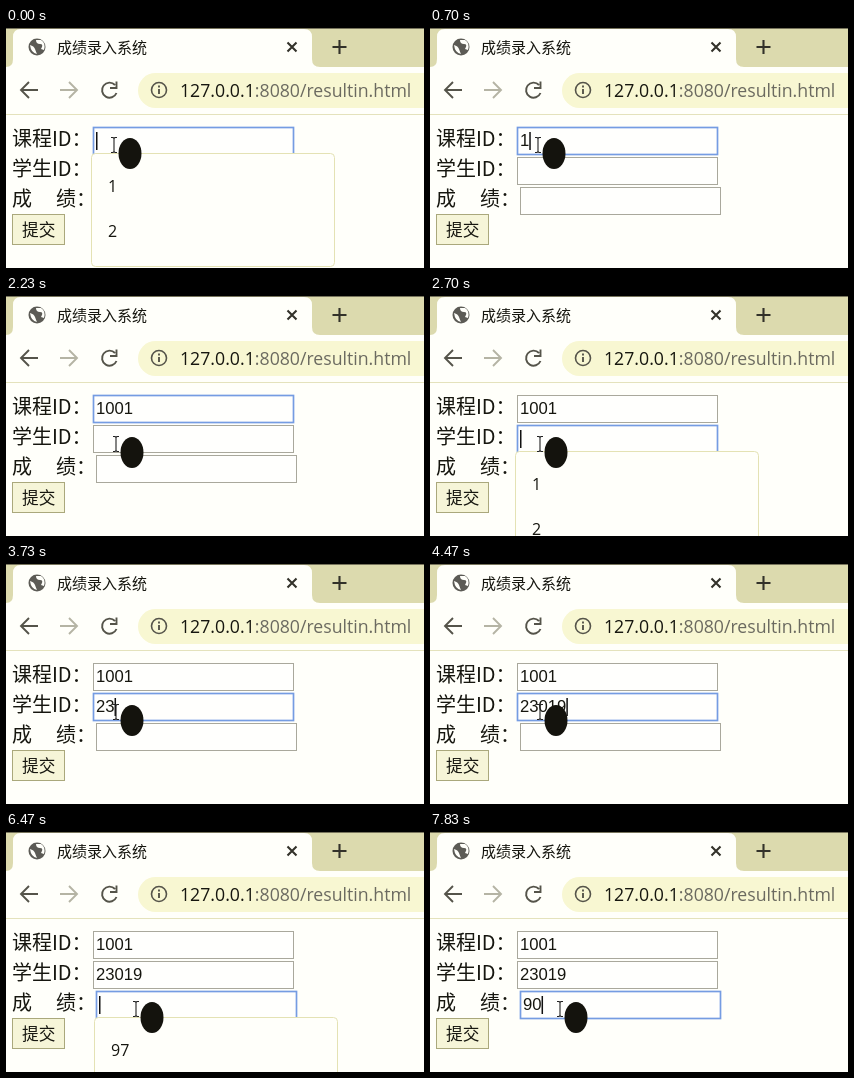
An HTML page for the animation above (8 s loop, 418 by 240 pixels).

```html
<!DOCTYPE html>
<html lang="zh-CN">
<head>
<meta charset="utf-8">
<title>成绩录入系统</title>
<style>
  html, body { margin: 0; width: 100%; height: 100%; overflow: hidden; background: #fffffa; }
  svg { display: block; }
  text { fill: #16160f; white-space: pre; }
  .cjk { font-family: "Noto Sans CJK SC", "Noto Sans CJK", sans-serif; }
  .label { font-size: 20px; }
  .url { font: 17.7px "Open Sans", "Noto Sans", sans-serif; }
  .value { font: 16.67px "Liberation Sans", Arial, sans-serif; }
  .item { font: 16px "Open Sans", "Noto Sans", sans-serif; }
  .icon { fill: none; stroke: #55544a; stroke-width: 1.9; }
  .dark { stroke: #33322a; stroke-width: 2.1; }
  .box { fill: #fffffd; stroke: #a9a89c; stroke-width: 1; }
  .box.focus { stroke: #759ce2; stroke-width: 1.7; }
</style>
</head>
<body>
<svg width="418" height="240" viewBox="0 0 418 240">
  <!-- tab strip -->
  <rect width="418" height="39" fill="#dcdaae"/>
  <path d="M0 39Q7 39 7 31V9Q7 1 15 1H298Q306 1 306 9V31Q306 39 314 39Z" fill="#fffffa"/>
  <rect width="418" height="1" fill="#77745c"/>
  <circle cx="31" cy="19" r="8.5" fill="#5c5b55"/>
  <path d="M24 17Q28 18 29 21T31 26Q25 25 24 17M30 12Q30 16 34 16T35 21L38 22Q40 15 35 12Z" fill="#fffffa"/>
  <text class="cjk" x="51" y="24.5" font-size="15">成绩录入系统</text>
  <path class="icon dark" d="M281.5 14.5l9 9m0-9l-9 9M326.500 19h14M333.500 12v14"/>

  <!-- toolbar -->
  <rect y="39" width="418" height="47" fill="#fffffa"/>
  <rect x="132" y="45" width="310" height="35" rx="17.500" fill="#f8f7d2"/>
  <path d="M0 86.500H418" stroke="#e4e2bc"/>
  <path class="icon" d="M32 62H15.500M23 54l-8 8 8 8"/>
  <path class="icon" d="M54 62H70.500M63 54l8 8-8 8" style="stroke:#b5b4a4"/>
  <path class="icon" d="M109 57A7.500 7.500 0 1 0 110.500 65M110.500 53.500V60H104"/>
  <circle class="icon" cx="153" cy="62" r="7.500" style="stroke-width:1.6"/>
  <path class="icon" d="M153 61v5M153 57.500v2"/>
  <text class="url" x="174" y="68.500">127.0.0.1<tspan fill="#6b6a60">:8080/resultin.html</tspan></text>

  <!-- form -->
  <text class="cjk label" x="6" y="118">课程ID：</text>
  <text class="cjk label" x="6" y="148">学生ID：</text>
  <text class="cjk label" x="6" y="178">成</text>
  <text class="cjk label" x="50" y="178">绩：</text>
  <g id="fields"></g>
  <rect x="6.500" y="186.500" width="52" height="30" fill="#f6f5d8" stroke="#aaa87c"/>
  <text class="cjk" x="16" y="208" font-size="16.67">提交</text>

  <rect id="caret" width="1.5" height="18" fill="#111"/>
  <g id="popup">
    <rect x=".5" y=".5" width="243" rx="4" fill="#fffffa" stroke="#e4e2b4"/>
    <text class="item" x="17" y="39"></text>
    <text class="item" x="17" y="84"></text>
  </g>
  <g id="pointer">
    <path d="M-3-7.500H-1L0-6.500 1-7.500H3M0-6.500V6.500M-3 7.500H-1L0 6.500 1 7.500H3" fill="none" stroke="#222" stroke-width="1.1"/>
    <ellipse cx="16" cy="8.500" rx="11.500" ry="15.500" fill="#14130d"/>
  </g>
</svg>
<script>
const LOOP = 8000, BLINK = 530, DIGIT = 9.27;
const $ = id => document.getElementById(id);
const lefts = [87.5, 87.5, 90.5];
const topOf = i => 99.5 + 30 * i;

$('fields').innerHTML = lefts.map((x, i) =>
  `<rect class="box" x="${x}" y="${topOf(i)}" width="200" height="27"/>
   <text class="value" x="${x + 2.5}" y="${topOf(i) + 18.5}"></text>`).join('');
const boxes = document.querySelectorAll('.box');
const values = document.querySelectorAll('.value');
const items = document.querySelectorAll('.item');

// time, field, value, suggestions
const inputs = [
  [-360, 0, '', ['1', '2']],
  [700, 0, '1'], [930, 0, '10'], [1230, 0, '100'], [1470, 0, '1001'],
  [2370, 1, '', ['1', '2']],
  [3530, 1, '2'], [3700, 1, '23'], [3900, 1, '230'], [4230, 1, '2301'], [4440, 1, '23019'],
  [5405, 2, '', ['97']],
  [7230, 2, '9', ['97']], [7780, 2, '90']
];

// time, x, y
const path = [
  [0, 108, 117], [1970, 108, 117], [2060, 128, 140], [2120, 158, 154],
  [2180, 124, 159], [2230, 110, 148], [4940, 110, 148], [5100, 118, 165],
  [5230, 125, 178], [5350, 131, 179], [5720, 131, 179], [5770, 130, 177], [LOOP, 130, 177]
];

function pointerAt(t) {
  const k = path.findIndex(p => p[0] > t);
  const [t0, x0, y0] = path[k - 1], [t1, x1, y1] = path[k];
  const u = (t - t0) / (t1 - t0);
  return [x0 + (x1 - x0) * u, y0 + (y1 - y0) * u];
}

function draw(t) {
  const texts = ['', '', ''];
  let last;
  for (const step of inputs) {
    if (step[0] > t) break;
    last = step;
    texts[step[1]] = step[2];
  }
  const [since, field, value, list = []] = last;

  boxes.forEach((b, i) => b.classList.toggle('focus', i === field));
  values.forEach((v, i) => v.textContent = texts[i]);

  const caret = $('caret');
  caret.setAttribute('x', lefts[field] + 2.5 + value.length * DIGIT);
  caret.setAttribute('y', topOf(field) + 4.5);
  caret.style.display = (t - since) % (2 * BLINK) < BLINK ? '' : 'none';

  const popup = $('popup');
  popup.style.display = list.length ? '' : 'none';
  popup.setAttribute('transform', `translate(${lefts[field] - 2.5} ${topOf(field) + 25.5})`);
  popup.firstElementChild.setAttribute('height', 23 + 45 * list.length);
  items.forEach((el, i) => el.textContent = list[i] || '');

  $('pointer').setAttribute('transform', `translate(${pointerAt(t)})`);
}

const start = performance.now();
function tick() {
  draw((performance.now() - start) % LOOP);
  requestAnimationFrame(tick);
}
tick();
</script>
</body>
</html>
```
